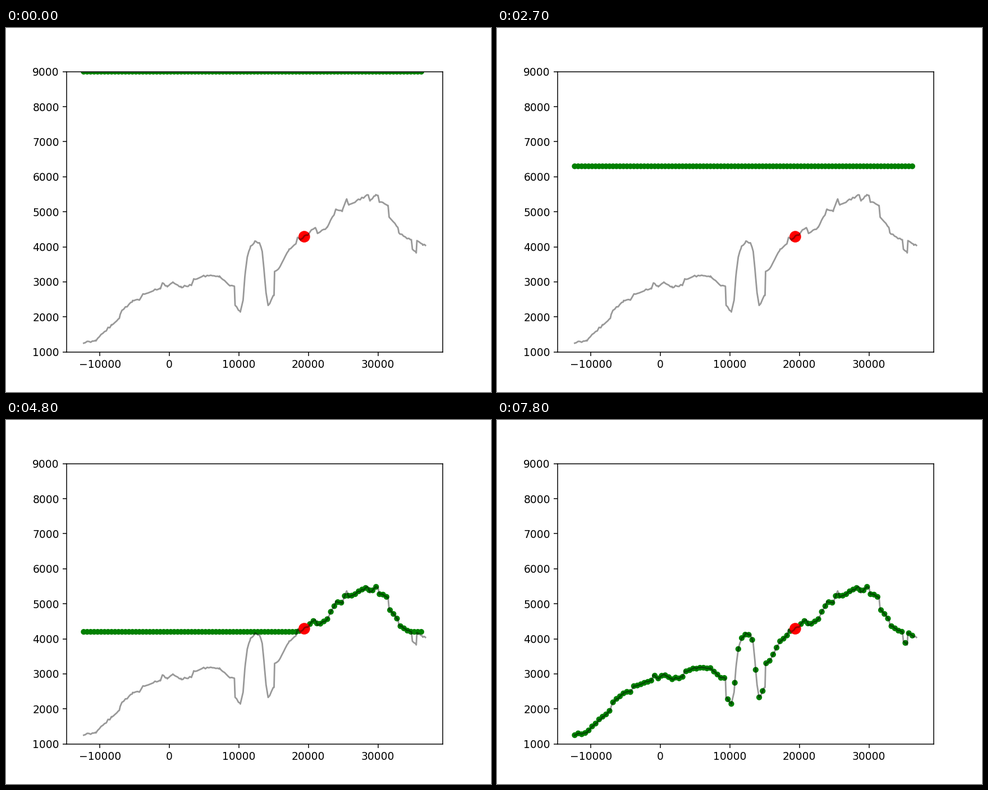
A matplotlib script for the animation above (10 s loop, 864 px wide and 648 px high).

```python
import matplotlib.pyplot as plt
import numpy as np
from matplotlib.animation import FuncAnimation

TOP, DROP = 9000, 100
COUNT = 98
TARGET = (19400, 4290)

# Turning points of the terrain: (distance in thousands, height).
KEYS = np.array([
    (-12.32, 1260), (-10.6, 1330), (-8.3, 1770), (-7.2, 1960), (-6.9, 2175),
    (-5.3, 2455), (-4.3, 2495), (-3.8, 2645), (-1.3, 2815), (-1, 2970),
    (-0.3, 2865), (0.5, 2980), (1.7, 2850), (3.2, 2905), (3.5, 3090),
    (6.1, 3200), (7.2, 3150), (8.7, 2890), (9.35, 2870), (9.45, 2340),
    (10.2, 2140), (10.6, 2470), (10.85, 3140), (11.2, 3720), (11.6, 3980),
    (12.3, 4135), (12.95, 4100), (13.35, 3870), (13.6, 3350), (13.9, 2680),
    (14.2, 2340), (15.05, 2630), (15.13, 3280), (15.7, 3370), (17.2, 3920),
    (18.2, 4090), (18.45, 4280), (18.9, 4200), (21, 4560), (21.3, 4370),
    (22.7, 4555), (23.95, 5060), (24.85, 5030), (25.5, 5380), (25.8, 5180),
    (28.6, 5500), (28.85, 5310), (29.6, 5465), (30, 5465), (30.2, 5270),
    (31.45, 5190), (31.6, 4850), (32.85, 4570), (33, 4390), (34.8, 4190),
    (34.95, 3930), (35.5, 3830), (35.6, 4180), (36.4, 4050), (36.82, 4050)])


def terrain():
    """Join the turning points and add a little seeded roughness."""
    key_x = KEYS[:, 0] * 1000
    x = np.union1d(key_x, np.arange(key_x[0], key_x[-1], 250))
    rough = np.random.default_rng(4).normal(0, 14, len(x))
    return x, np.interp(x, key_x, KEYS[:, 1]) + rough


line_x, line_y = terrain()
dot_x = np.linspace(-12320, 36230, COUNT)
ground = np.interp(dot_x, line_x, line_y)

fig, ax = plt.subplots(figsize=(6.4, 4.8), dpi=135)
margin = 0.05 * (line_x[-1] - line_x[0])
ax.set_xlim(line_x[0] - margin, line_x[-1] + margin)
ax.set_ylim(1000, TOP)
ax.plot(line_x, line_y, color="black", alpha=0.4)
dots = ax.scatter(np.append(dot_x, TARGET[0]), np.full(COUNT + 1, TOP),
                  s=[20] * COUNT + [100],
                  c=["green"] * COUNT + ["red"])


def update(i):
    """Lower the sheet of dots until each one rests on the terrain."""
    level = np.maximum(ground, TOP - DROP * i)
    dots.set_offsets([*zip(dot_x, level), TARGET])
    return (dots,)


anim = FuncAnimation(fig, update, frames=100, interval=100, repeat=True)
plt.show()
```
